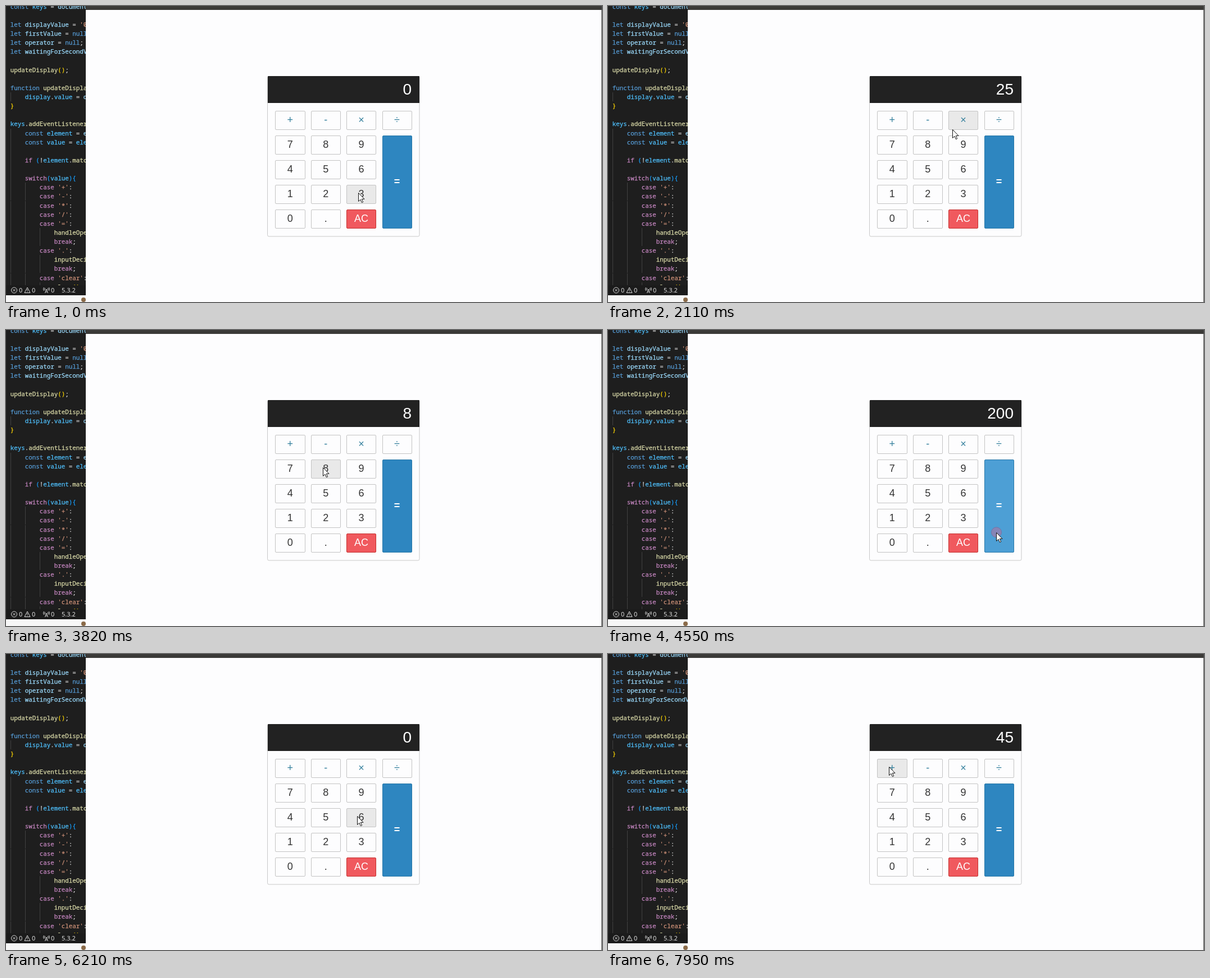
Animation of 1061x528 px, one loop 8 s. Source, as an HTML page:

```html
<!DOCTYPE html>
<html lang="en">
<head>
<meta charset="utf-8">
<title>Calculator</title>
<style>
  html, body { margin: 0; width: 100%; height: 100%; overflow: hidden; background: #fdfdfe; }
  svg { display: block; width: 1061px; height: 528px; }
  .code text { font: 10.83px "Noto Sans Mono", monospace; white-space: pre; stroke-width: .25px; }
  .status { font: 11px "Noto Sans", sans-serif; fill: #e0e0e0; }
  .icon { fill: none; stroke: #d8d8d8; }
  .key text { font: 18px "Liberation Sans", Arial, sans-serif; text-anchor: middle; fill: #333; }
  .key rect { fill: #fdfdfe; stroke: #c3c3c3; }
  .key.op text { fill: #337f9c; }
  .key.hover rect { fill: #e9e9e9; }
  .key.equal text, .key.clear text { fill: #fff; }
  .key.equal text { font-weight: bold; }
  .key.equal rect { fill: #2e86c0; stroke: #2878a8; }
  .key.equal.hover rect { fill: #4d9fd5; }
  .key.clear rect { fill: #f0595e; stroke: #c4302f; }
  .key.clear.hover rect { fill: #f37478; }
  #display { font: 28px "Liberation Sans", Arial, sans-serif; fill: #fff; text-anchor: end; }
</style>
</head>
<body>
<svg viewBox="0 0 1061 528">
  <rect width="142" height="528" fill="#1e1e1e"/>
  <g class="code" id="code"></g>
  <rect y="498" width="142" height="18" fill="#1b1b1b"/>
  <g class="icon">
    <circle cx="14.5" cy="507" r="5"/>
    <path d="M12.5 505l4 4m0-4l-4 4M38 502l5 9.500h-10zM38 505v3m0 1v1"/>
    <path d="M69.500 512l2.500-7 2.500 7m-4-2h3M69.500 503q-1.500 2 0 4m5-4q1.500 2 0 4M67.500 502q-2 3 0 6m9-6q2 3 0 6"/>
  </g>
  <g class="status">
    <text x="23" y="511">0</text><text x="46" y="511">0</text>
    <text x="80" y="511">0</text><text x="99" y="511">5.3.2</text>
  </g>
  <rect y="516" width="142" height="12" fill="#f7f7f7"/>
  <circle cx="138" cy="524" r="4" fill="#8a6a48"/>
  <rect x="142" width="919" height="528" fill="#fdfdfe"/>
  <rect x="142" width="919" height="7" fill="#3b3a38"/>
  <rect x="1060" width="1" height="528" fill="#4a4a4a"/>
  <rect x="465.500" y="125.500" width="270.500" height="285.500" rx="2.500" fill="#fdfdfe" stroke="#c8c8c8"/>
  <path d="M466 173V126q0-1 1-1H735q1 0 1 1V173z" fill="#222"/>
  <text id="display" x="722" y="158"></text>
  <g id="keys"></g>
  <circle id="ripple" fill="#d9608a" fill-opacity=".75" stroke="#93507f"/>
  <path id="cursor" d="M.5.5V15.500L4 12.300 6.400 17.700 8.700 16.700 6.300 11.400H11z" fill="#fff" stroke="#111"/>
</svg>
<script>
const LOOP = 8000;
const byId = id => document.getElementById(id);

function add(parent, tag, attrs, text) {
  const node = document.createElementNS('http://www.w3.org/2000/svg', tag);
  for (const name in attrs) node.setAttribute(name, attrs[name]);
  if (text !== undefined) node.textContent = text;
  return parent.appendChild(node);
}

// Editor
const source = `const keys = document

let displayValue = '0'
let firstValue = null;
let operator = null;
let waitingForSecondValue

updateDisplay();

function updateDisplay()
    display.value = displayValue
}

keys.addEventListener()
    const element = e.target
    const value = element

    if (!element.matches()

    switch(value){
        case '+':
        case '-':
        case '*':
        case '/':
        case '=':
            handleOperator()
            break;
        case '.':
            inputDecimal()
            break;
        case 'clear':
            clear();`;

const syntax = [
  [/^(const|let|null|function)$/, '#569cd6'],
  [/^(if|switch|case|break)$/, '#c586c0'],
  [/^'/, '#ce9178'],
  [/^\w+(?=\()/, '#dcdcaa'],
  [/^(keys|display|element|value)$/, '#4fc1ff'],
  [/^\w/, '#9cdcfe']
];

function tokenColor(token, next, indent) {
  if (/[(){}]/.test(token)) return indent === 1 ? '#179fff' : '#ffd700';
  const rule = syntax.find(([pattern]) => pattern.test(token) || pattern.test(token + next));
  return rule ? rule[1] : '#d4d4d4';
}

let guides = 0;
source.split('\n').forEach((line, row) => {
  const y = Math.round(4.7 + row * 16.13);
  const text = add(byId('code'), 'text', { x: 7.7, y });
  const tokens = line.match(/'[^']*'|\w+|\s+|./g) || [];
  const indent = line.search(/\S/) / 4;
  tokens.forEach((token, i) => {
    const color = tokenColor(token, tokens[i + 1] === '(' ? '(' : '', indent);
    add(text, 'tspan', { fill: color, stroke: color }, token);
  });
  // Blank lines keep the guides of the block around them.
  if (line) guides = indent;
  for (let level = 0; level < guides; level++)
    add(byId('code'), 'path', { d: `M${8.5 + level * 26} ${y - 12}v16`, stroke: '#404040' });
});

// Keypad
const keys = {};
function addKey(label, col, row, type = '', rows = 1) {
  const left = 479.4 + col * 63.4;
  const x = Math.round(left) + 0.5, y = Math.floor(187 + row * 44.1) + 0.5;
  const width = Math.floor(left + 52.8) + 0.5 - x, height = 33 + (rows - 1) * 44;
  const node = add(byId('keys'), 'g', { class: 'key ' + type });
  add(node, 'rect', { x, y, width, height, rx: 1.5 });
  add(node, 'text', { x: left + 26.4, y: Math.round(y + height / 2 + 5) }, label);
  keys[label] = { node, x, y, width, height };
}
['+-×÷', '789', '456', '123', '0.'].forEach((labels, row) =>
  [...labels].forEach((label, col) => addKey(label, col, row, row ? '' : 'op')));
addKey('AC', 2, 4, 'clear');
addKey('=', 3, 1, 'equal', 4);

// Pointer stops: key, arrival time and, where the key is clicked, the press time.
const TRAVEL = 300, RIPPLE = 400, RELEASE = 110;
const stops = [
  ['3', 0], ['2', 320, 870], ['5', 1330, 1470], ['×', 2200, 2310], ['8', 3090, 3150],
  ['=', 4230, 4370], ['AC', 5150, 5610], ['6', 6200], ['4', 6390, 6450],
  ['5', 7130, 7270], ['+', 7950]
].map(([label, arrive, press]) => {
  const { x, y, height } = keys[label];
  return { label, arrive, press, x: x + 20, y: y + height * 0.875 - 15 };
});
const presses = stops.filter(stop => stop.press);

// Run the calculator once to learn what it shows after each click.
let shown = '0', first = 0, fresh = true;
for (const stop of presses) {
  if (/\d/.test(stop.label)) {
    shown = fresh ? stop.label : shown + stop.label;
    fresh = false;
  } else {
    if (stop.label === 'AC') shown = '0';
    if (stop.label === '=') shown = String(first * shown);
    first = Number(shown);
    fresh = true;
  }
  stop.shown = shown;
}

const ease = k => k * k * (3 - 2 * k);

function pointerAt(t) {
  const i = stops.findIndex(stop => stop.arrive > t);
  if (i < 0) return stops[stops.length - 1];
  const from = stops[i - 1], to = stops[i];
  const leave = Math.max(from.arrive, to.arrive - TRAVEL);
  const k = ease(Math.max(0, (t - leave) / (to.arrive - leave)));
  return { x: from.x + (to.x - from.x) * k, y: from.y + (to.y - from.y) * k };
}

function drawRipple(t) {
  const stop = presses.findLast(item => item.press <= t);
  const k = stop ? Math.min(1, (t - stop.press) / RIPPLE) : 1;
  const { x, y } = stop || stops[0];
  const attrs = { cx: x + 1, cy: y, r: 20 * k, opacity: 1 - k };
  for (const name in attrs) byId('ripple').setAttribute(name, attrs[name]);
}

function draw(t) {
  const pointer = pointerAt(t);
  const x = Math.round(pointer.x), y = Math.round(pointer.y);
  byId('cursor').setAttribute('transform', `translate(${x} ${y})`);
  for (const key of Object.values(keys)) {
    const over = x >= key.x && x <= key.x + key.width && y >= key.y && y <= key.y + key.height;
    key.node.classList.toggle('hover', over);
  }
  const last = presses.findLast(stop => stop.press + RELEASE <= t);
  byId('display').textContent = last ? last.shown : '0';
  drawRipple(t);
}

const begin = performance.now();
function tick() {
  draw((performance.now() - begin) % LOOP);
  requestAnimationFrame(tick);
}
draw(0);
requestAnimationFrame(tick);
</script>
</body>
</html>
```
